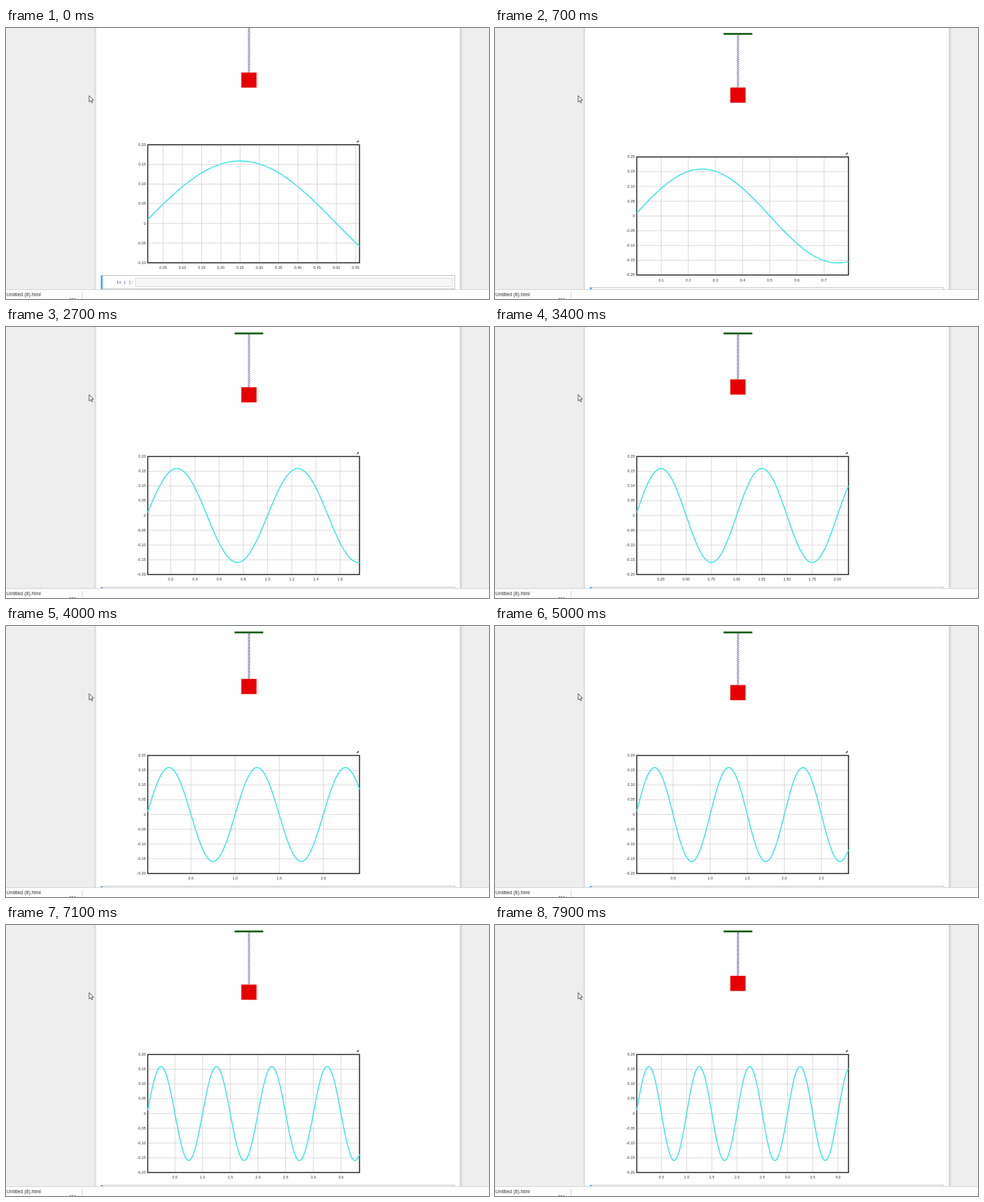
Animation of 690 by 388 pixels, one loop 8 s. Source, as an HTML page with a canvas:

```html
<!DOCTYPE html>
<html lang="en">
<head>
<meta charset="utf-8">
<title>Mass on a spring</title>
<style>
  html, body { margin: 0; width: 100%; height: 100%; overflow: hidden; background: #eee; }
  canvas { display: block; }
</style>
</head>
<body>
<canvas id="stage" width="690" height="388"></canvas>
<script>
const ctx = document.getElementById('stage').getContext('2d');
const SANS = '"Liberation Sans", Arial, sans-serif';
const MONO = '"Liberation Mono", monospace';
const LOOP = 8000, FRAME = 100;
const PLOT = { left: 202.5, right: 505, top: 167.2, bottom: 336.2 };

// [clock ms, value] pairs, joined by straight lines
const SIM_TIME = [[0, .56], [100, .58], [200, .58], [300, .61], [700, .79], [2700, 1.76],
  [4000, 2.41], [5000, 2.865], [6200, 3.41], [7900, 4.21]];
const SCROLL = [[0, 0], [300, 0], [400, 10], [500, 17.4], [1200, 17.5], [1300, 18.2]];

function track(keys, t) {
  let i = 1;
  while (i < keys.length && keys[i][0] < t) i++;
  if (i === keys.length) return keys[i - 1][1];
  const [t0, a] = keys[i - 1], [t1, b] = keys[i];
  return a + (b - a) * (t - t0) / (t1 - t0);
}

const displacement = s => .159 * Math.sin(2 * Math.PI * s);

function rect(x, y, w, h, color) {
  ctx.fillStyle = color;
  ctx.fillRect(x, y, w, h);
}

function frame(x, y, w, h, color, width) {
  ctx.strokeStyle = color;
  ctx.lineWidth = width;
  ctx.strokeRect(x, y, w, h);
}

function line(points, color, width) {
  ctx.beginPath();
  points.forEach(([x, y]) => ctx.lineTo(x, y));
  ctx.strokeStyle = color;
  ctx.lineWidth = width;
  ctx.stroke();
}

function text(str, x, y, size, color, align = 'left', family = SANS) {
  ctx.font = `${size}px ${family}`;
  ctx.textAlign = align;
  ctx.textBaseline = 'middle';
  ctx.fillStyle = color;
  ctx.fillText(str, x, y);
}

// Round a wanted tick spacing to 1, 2, 2.5 or 5 times a power of ten
function tickStep(range, count) {
  const delta = range / count;
  const mag = 10 ** Math.floor(Math.log10(delta));
  const norm = delta / mag;
  const size = norm < 1.5 ? 1 : norm <= 2.25 ? 2 : norm < 3 ? 2.5 : norm < 7.5 ? 5 : 10;
  return size * mag;
}

function drawSpring(s) {
  const y = 72 - 43 * displacement(s), top = -8, end = y - 11, coils = 26;
  const wire = [];
  for (let i = 0; i <= coils * 8; i++) {
    const u = i / (coils * 8);
    wire.push([347.2 + 1.6 * Math.sin(2 * Math.PI * coils * u), top + (end - top) * u]);
  }
  line(wire, '#7474a6', .9);
  rect(326.5, -10.3, 41, 2.6, '#0a5a0a');
  rect(336.2, y - 10.8, 21.7, 21.7, '#e60000');
}

function drawPlot(s) {
  const { left, right, top, bottom } = PLOT;
  const lowest = s < .75 ? Math.min(0, displacement(s)) : -.159;
  const yMin = -.05 * Math.ceil((.005 - lowest) / .05);
  const px = v => left + (v - .01) / (s - .01) * (right - left);
  const py = v => bottom - (v - yMin) / (.2 - yMin) * (bottom - top);
  const grid = '#d3d0d1';

  const step = tickStep(s - .01, 7.82);
  const digits = step < .07 || Math.abs(step - .25) < .01 ? 2 : 1;
  for (let i = 1; i * step <= s + 1e-6; i++) {
    const x = px(i * step);
    line([[x, top], [x, bottom]], grid, .8);
    text((i * step).toFixed(digits), x, 343.6, 5.4, '#333', 'center');
  }
  for (let i = Math.round(yMin / .05); i <= 4; i++) {
    const y = py(i * .05);
    line([[left, y], [right, y]], grid, .8);
    text(i ? (i * .05).toFixed(2) : '0', 199.8, y + .2, 5.4, '#333', 'right');
  }
  frame(left, top, right - left, bottom - top, '#2b2b2b', 1.5);

  const curve = [];
  for (let v = .01; v < s; v += .01) curve.push([px(v), py(displacement(v))]);
  curve.push([px(s), py(displacement(s))]);
  line(curve, '#3ce6e8', 1.5);
  line([[501.3, 163.6], [504, 161.2]], '#444', 1.5);
}

function drawCell() {
  frame(136, 354.4, 505, 19.2, '#b4b4b4', .8);
  rect(135.6, 354.2, 2.4, 19.6, '#42a5f5');
  text('In [ ]:', 158, 364.3, 5.7, '#303f9f', 'left', MONO);
  rect(185, 358, 452.5, 12.4, '#f7f7f7');
  frame(185, 358, 452.5, 12.4, '#cfcfcf', .7);
}

function drawPointer() {
  ctx.beginPath();
  [[118.8, 96.8], [118.8, 105.8], [120.9, 104], [122.4, 107.2], [123.8, 106.5],
    [122.4, 103.4], [125.1, 103.2]].forEach(([x, y]) => ctx.lineTo(x, y));
  ctx.closePath();
  ctx.fillStyle = '#fff';
  ctx.fill();
  ctx.strokeStyle = '#333';
  ctx.lineWidth = .8;
  ctx.stroke();
}

function drawFooter() {
  rect(0, 374, 690, 14, '#fdfdfd');
  rect(0, 374, 690, .8, '#cfcfcf');
  text('Untitled (8).html', .5, 382.3, 7, '#333');
  rect(108.5, 378, .8, 10, '#ccc');
  [91, 94, 97.5].forEach(x => rect(x, 387, 1.8, 1, '#666'));
}

function draw(t) {
  const s = track(SIM_TIME, t);
  rect(0, 0, 690, 388, '#eee');
  ctx.save();
  ctx.shadowColor = 'rgba(0,0,0,.3)';
  ctx.shadowBlur = 4;
  rect(128.5, -10, 520, 400, '#fff');
  ctx.restore();

  ctx.save();
  ctx.translate(0, track(SCROLL, t));
  drawSpring(s);
  drawPlot(s);
  drawCell();
  ctx.restore();

  drawFooter();
  drawPointer();
}

const start = performance.now();
function tick() {
  const t = (performance.now() - start) % LOOP;
  draw(Math.floor(t / FRAME) * FRAME);
  requestAnimationFrame(tick);
}
tick();
</script>
</body>
</html>
```
